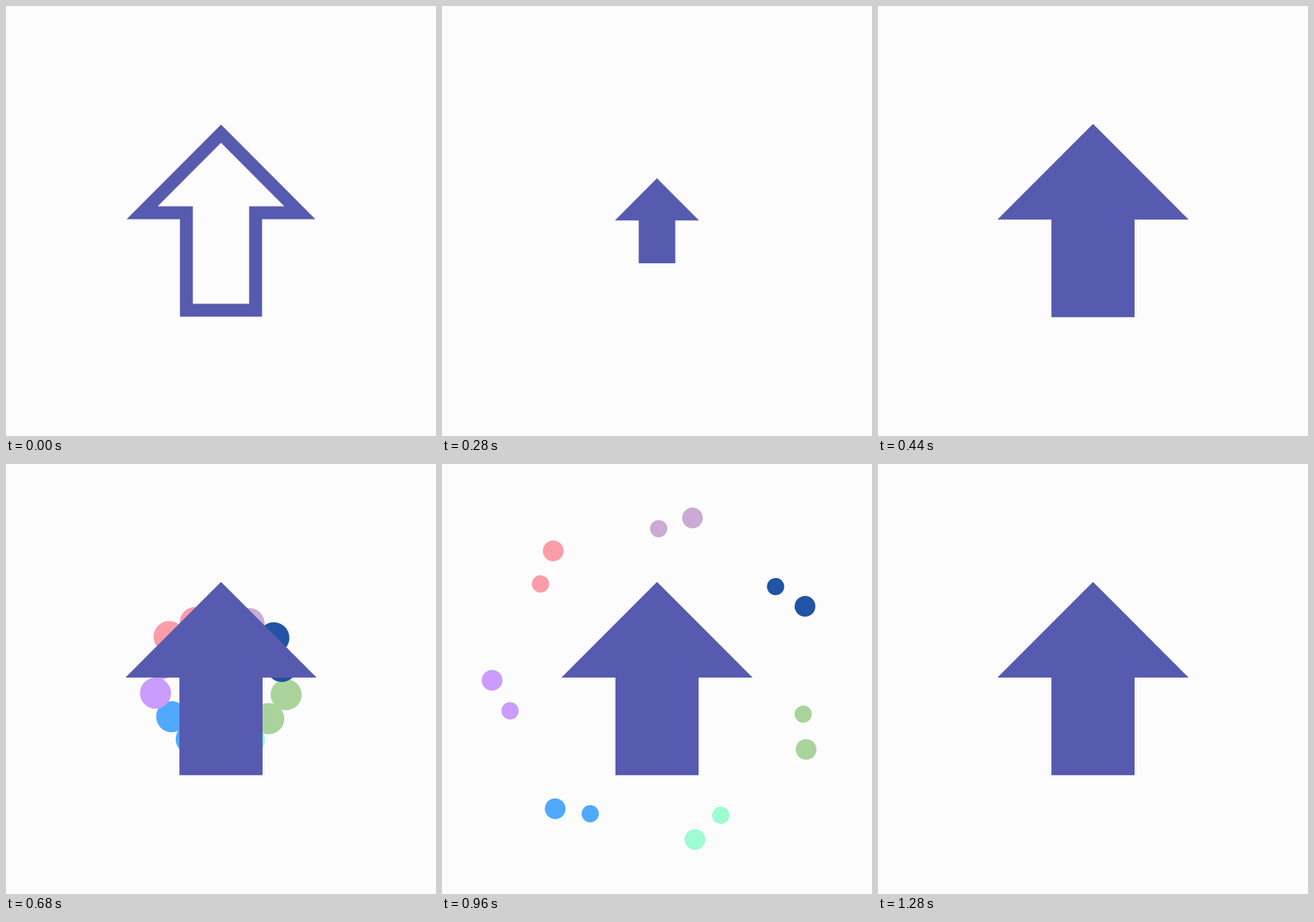
An HTML page with a canvas that plays this animation: 600x600 px, repeating every 1520 ms.

```html
<!DOCTYPE html>
<html lang="en">
<head>
<meta charset="utf-8">
<title>Upvote burst</title>
<style>
  html, body { margin: 0; height: 100%; overflow: hidden; background: #fcfcfc; }
  canvas { display: block; width: 600px; height: 600px; }
</style>
</head>
<body>
<canvas id="stage" width="600" height="600"></canvas>
<script>
const ctx = document.getElementById('stage').getContext('2d');
const LOOP = 1520, STEP = 40;
const ARROW = '#575bb0';
const COLORS = ['#aad39c', '#9dfcd2', '#50a9fd', '#ca9cfd', '#fb9da9', '#cbaad6', '#2253a4'];
const arrow = new Path2D('M0-121.8L110-11.6H48.3V124.5H-48.3V-11.6H-110Z');

// Keys are [time, value, slope per ms], joined by cubic Hermite curves.
const SCALE = [[120, 1, 0], [240, 0.2, 0], [280, 0.44, 0.0095], [360, 1.2, 0], [440, 1, 0]];
const INNER = [[680, 93.5, 0.85], [800, 170.3, 0.43], [960, 209.8, 0.11], [1280, 218, 0]];
const OUTER = [[680, 79.8, 0.62], [800, 152.3, 0.58], [960, 227.6, 0.29], [1280, 256, 0]];

const clamp = x => Math.min(1, Math.max(0, x));

function track(keys, t) {
  if (t <= keys[0][0]) return keys[0][1];
  const i = keys.findIndex(key => t < key[0]);
  if (i < 0) return keys[keys.length - 1][1];
  const [t0, a, va] = keys[i - 1], [t1, b, vb] = keys[i];
  const d = t1 - t0, u = (t - t0) / d, w = 1 - u;
  return w * w * ((1 + 2 * u) * a + u * d * va) + u * u * ((3 - 2 * u) * b - w * d * vb);
}

function dot(degrees, along, across, radius) {
  ctx.save();
  ctx.rotate(degrees * Math.PI / 180);
  ctx.beginPath();
  ctx.arc(along, across, radius, 0, 2 * Math.PI);
  ctx.fill();
  ctx.restore();
}

function drawBurst(t) {
  const innerRadius = 21.7 * clamp((1190 - t) / 414);
  const outerRadius = 21.7 * clamp((1280 - t) / 480);
  COLORS.forEach((color, i) => {
    const turn = i * 360 / COLORS.length;
    ctx.fillStyle = color;
    dot(turn + 13.5, track(INNER, t), 0, innerRadius);
    dot(turn + 16.85, track(OUTER, t), 33.7, outerRadius);
  });
}

function drawArrow(t) {
  const scale = track(SCALE, t), filled = t >= 240;
  ctx.scale(scale, scale);
  ctx.strokeStyle = ctx.fillStyle = ARROW;
  ctx.lineWidth = filled ? 19.4 : 18;
  if (filled) ctx.fill(arrow);
  ctx.stroke(arrow);
}

function draw(now) {
  const t = Math.floor(now % LOOP / STEP) * STEP;
  ctx.fillStyle = '#fcfcfc';
  ctx.fillRect(0, 0, 600, 600);
  ctx.save();
  ctx.translate(300, 300);
  if (t >= 680 && t < 1280) drawBurst(t);
  drawArrow(t);
  ctx.restore();
}

let start;
function tick(now) {
  start ??= now;
  draw(now - start);
  requestAnimationFrame(tick);
}
draw(0);
requestAnimationFrame(tick);
</script>
</body>
</html>
```
